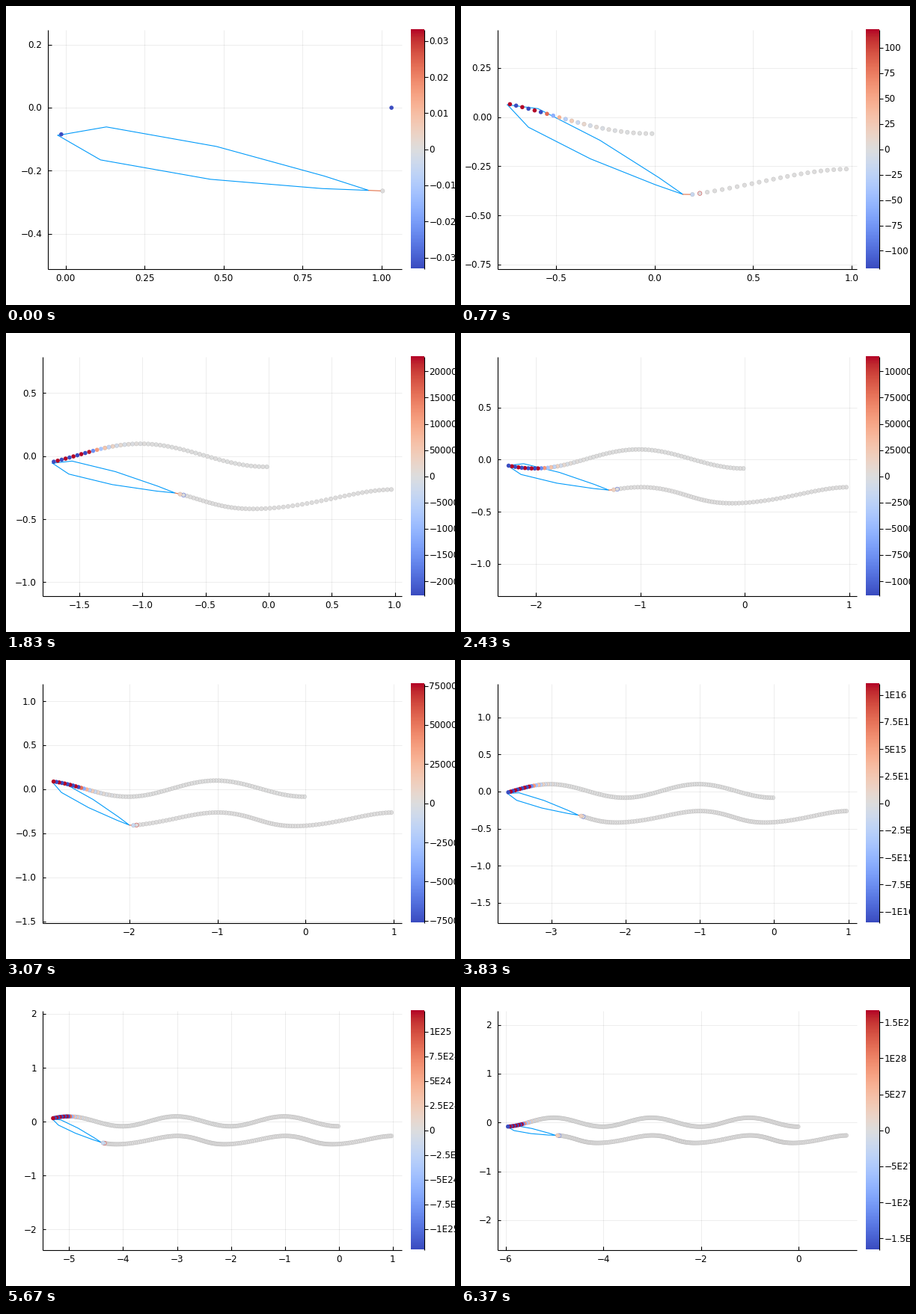
A matplotlib script for the animation above (6410 ms loop, 600 by 400 pixels).

```python
import numpy as np
import matplotlib.pyplot as plt
from matplotlib.animation import FuncAnimation
from matplotlib.collections import LineCollection

W, H, DPI = 600, 400, 100
FRAMES, LOOP = 192, 6410
PX = 72 / DPI
TOP, BOTTOM, RIGHT = 32, 351.5, 528.5
BAR_L, BAR_R = 540.5, 558.5
MID = (TOP + BOTTOM) / 2
CMAP = plt.get_cmap("coolwarm")

# symmetric 12 % foil with cosine spaced nodes
S = (1 - np.cos(np.linspace(0, np.pi, 5))) / 2
HALF = 0.6 * (0.2969 * np.sqrt(S) - 0.126 * S - 0.3516 * S**2
              + 0.2843 * S**3 - 0.1015 * S**4)
HALF[-1] = 0
FOIL_S = np.r_[S, S[-2::-1]]
FOIL_N = np.r_[HALF, -HALF[-2::-1]]

# colour scale limit (log10) over time
KEYS = [0, 23, 55, 92, 115, 149, 191]
LOG_LIM = np.log10([0.0331, 117.7, 3.37e7, 1.074e13, 1.51e16, 1.246e22, 2.337e28])


def body_point(step, s, n=0.0):
    """Point at chord position s and normal offset n of the moving foil."""
    t = np.asarray(step) / 32
    c = np.cos(np.pi * t)
    a = np.radians(20 - 10 * c)
    x = -t + 0.0045 + 0.0025 * c + s * np.cos(a) + n * np.sin(a)
    y = -0.088 * c - s * np.sin(a) + n * np.cos(a)
    return np.column_stack(np.broadcast_arrays(x, y))


def minus(s):
    return s.replace("-", "\u2212")


def nice_ticks(lo, hi):
    best = None
    base = np.floor(np.log10(hi - lo))
    for e in (base - 1, base):
        for m in (1, 5, 2, 2.5):
            step = m * 10**e
            i0, i1 = np.ceil(lo / step), np.floor(hi / step)
            score = abs(i1 - i0 + 1 - 5)
            if best is None or score < best[0]:
                best = score, step, i0, i1
    _, step, i0, i1 = best
    digits = 0
    while abs(step * 10**digits - round(step * 10**digits)) > 1e-6:
        digits += 1
    vals = np.arange(i0, i1 + 1) * step + 0.0
    return vals, [minus(f"{v:.{digits}f}") for v in vals]


def bar_ticks(lim):
    e = np.log10(2 * lim)
    n = round(e)
    f = 10**(e - n)
    unit = 1 if f > 2.5 else 0.5 if f > 1 else 0.2 if f > 0.5 else 0.1
    step = 0.5 * unit * 10.0**n
    k = int(lim / step)
    return np.arange(-k, k + 1) * step, step


def bar_label(v, step):
    if v == 0:
        return "0"
    e = int(np.floor(np.log10(abs(v)) + 1e-9))
    if e >= 15:
        return minus(f"{v / 10.0**e:.4g}E{e}")
    digits = max(0, 1 - int(np.floor(np.log10(step) + 1e-9)))
    s = f"{v:.{digits}f}"
    return minus(s.rstrip("0").rstrip(".") if "." in s else s)


fig = plt.figure(figsize=(W / DPI, H / DPI), dpi=DPI, facecolor="white")
ax = fig.add_axes([0, 0, 1, 1])
ax.imshow(np.linspace(1, 0, 256)[:, None], cmap=CMAP, aspect="auto",
          extent=(BAR_L, BAR_R, BOTTOM, TOP), interpolation="nearest")
ax.set_xlim(0, W)
ax.set_ylim(H, 0)
ax.axis("off")

grid = ax.add_collection(LineCollection([], colors=[(0, 0, 0, 0.1)], linewidths=0.7 * PX, zorder=1))
axis_lines = ax.add_collection(LineCollection([], colors="black", linewidths=1.1 * PX, zorder=2))
foil, = ax.plot([], [], color="#009AFA", lw=1.1 * PX, zorder=3)
wake, = ax.plot([], [], color="#E26F46", lw=1.1 * PX, zorder=3)
dots = ax.scatter([], [], s=(5.6 * PX)**2, linewidths=0.5 * PX, zorder=4)
labels = [ax.text(0, 0, "", fontsize=12 * PX, family="DejaVu Sans", va="baseline", zorder=5)
          for _ in range(40)]


def update(n):
    body = body_point(n + 1, FOIL_S, FOIL_N)
    edge = body_point(n + 1, 1.0)
    le_id = np.arange(n + 1)
    te_id = np.arange(min(n, 1), n + 1)
    le = body_point(le_id, -0.021)
    te = body_point(te_id, 1.0125)

    # vortex strengths alternate in sign and grow with every step
    keep = np.interp(n, [0, 23, 55], [0, 5, 9])
    sign = np.where(le_id % 2, 1, -1)
    le_val = sign * np.minimum(1, 0.71**(n - le_id - keep))
    te_val = np.zeros(len(te))
    now = sign[-1]
    if n:
        te_val[-1] = -0.15 * now
    pts, vals = np.vstack([te, le]), np.r_[te_val, le_val]
    if n == 0:
        pts, vals = np.vstack([pts, [1.0323, 0]]), np.r_[vals, -1]

    # equal aspect view: x fits the data, y is centred
    every = np.vstack([pts, body])
    (x0, y0), (x1, y1) = every.min(0), every.max(0)
    pad = 0.03 * (y1 - y0)
    wide = any(len(s) > 4 for s in nice_ticks(y0 - pad, y1 + pad)[1])
    left = 56 if wide else 48.5
    scale = (RIGHT - left) / (1.06 * (x1 - x0))
    xlo, ymid = x0 - 0.03 * (x1 - x0), (y0 + y1) / 2

    def to_px(p):
        return np.column_stack([left + (p[:, 0] - xlo) * scale, MID - (p[:, 1] - ymid) * scale])

    foil.set_data(*to_px(body).T)
    wake.set_data(*to_px(np.vstack([edge, te[-1:]])).T)
    dots.set_offsets(to_px(pts))
    dots.set_facecolors(CMAP(0.5 + 0.5 * vals))
    rims = np.zeros((len(pts), 4))
    rims[:, 3] = np.where(np.abs(vals) < 0.3, 0.16, 0)
    if n > 1:
        rims[len(te) - 2] = CMAP(0.5 + 0.45 * now)
    dots.set_edgecolors(rims)

    lines, ticks, texts = [], [], []
    half = (BOTTOM - TOP) / 2 / scale
    for v, s in zip(*nice_ticks(xlo, xlo + (RIGHT - left) / scale)):
        x = left + (v - xlo) * scale
        lines.append([(x, TOP), (x, BOTTOM)])
        ticks.append([(x, BOTTOM), (x, BOTTOM - 4.5)])
        texts.append((x, 367.5, s, "center"))
    for v, s in zip(*nice_ticks(ymid - half, ymid + half)):
        y = MID - (v - ymid) * scale
        lines.append([(left, y), (RIGHT, y)])
        ticks.append([(left, y), (left + 4.5, y)])
        texts.append((left - 7.5, y + 4.4, s, "right"))
    lim = 10**np.interp(n, KEYS, LOG_LIM)
    vals, step = bar_ticks(lim)
    for v in vals:
        y = MID - v / lim * (BOTTOM - TOP) / 2
        ticks.append([(BAR_R, y), (BAR_R + 5.5, y)])
        texts.append((565.5, y + 4.4, bar_label(v, step), "left"))
    ticks += [[(left, TOP), (left, BOTTOM)], [(left, BOTTOM), (RIGHT, BOTTOM)],
              [(BAR_R, TOP), (BAR_R, BOTTOM)]]
    grid.set_segments(lines)
    axis_lines.set_segments(ticks)
    for i, label in enumerate(labels):
        label.set_visible(i < len(texts))
        if i < len(texts):
            x, y, s, ha = texts[i]
            label.set(x=x, y=y, text=s, ha=ha)
    return []


anim = FuncAnimation(fig, update, frames=FRAMES, interval=LOOP / FRAMES,
                     repeat=True, repeat_delay=0, blit=False)
plt.show()
```
